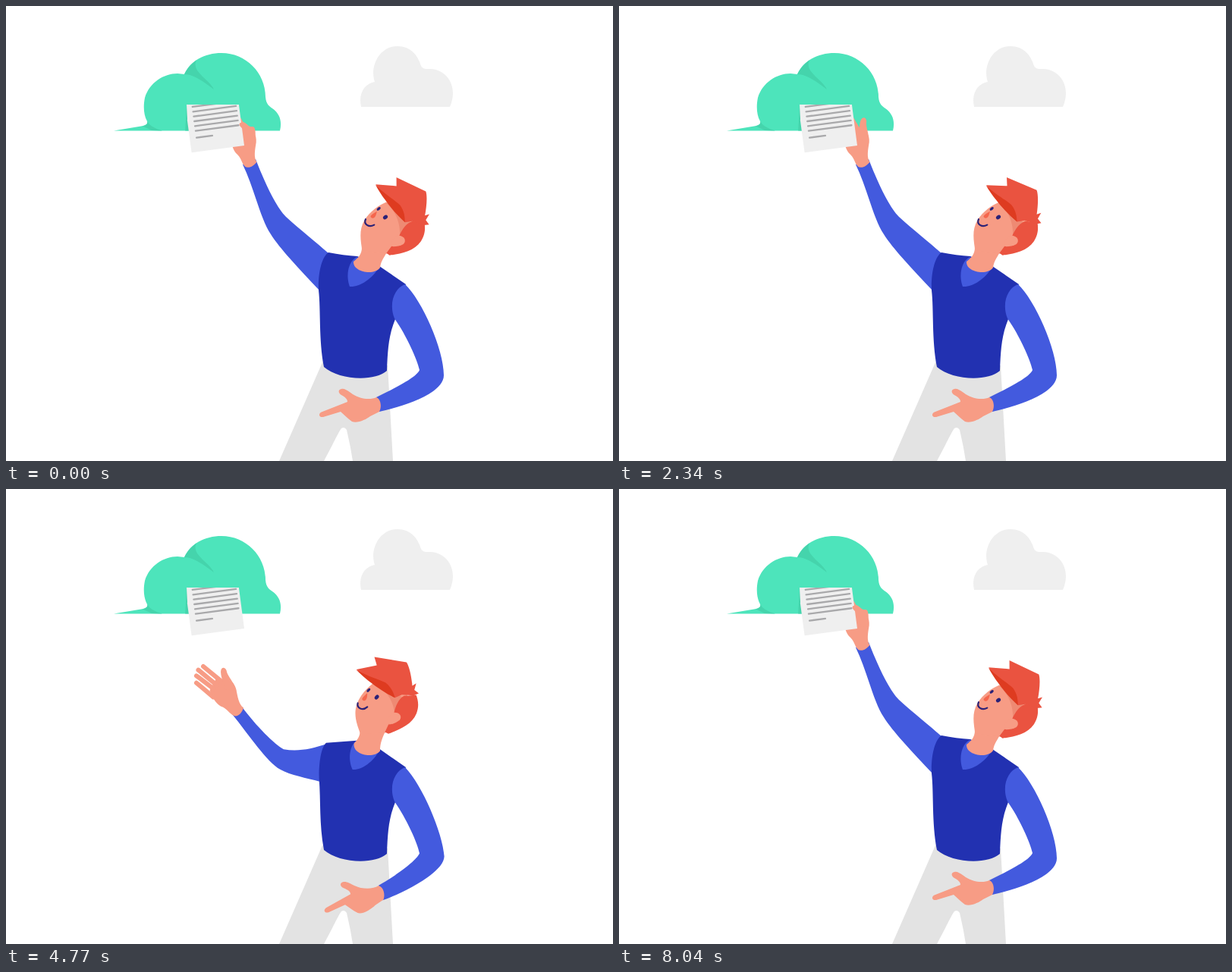
Write an HTML page that moves like this. It is 800 px wide and 600 px high and loops after 8.1 s.

```html
<!DOCTYPE html>
<html lang="en">
<head>
<meta charset="utf-8">
<title>Paper from the cloud</title>
<style>
html, body { margin: 0; width: 100%; height: 100%; overflow: hidden; background: #fff; }
svg { display: block; width: 800px; height: 600px; }
.skin { fill: #f79c85; }
.hair { fill: #ea5340; }
.sleeve { fill: #435ade; }
.vest { fill: #2231b1; }
.ink { fill: #2b2277; }
.grey { fill: #efefef; }
.fold { fill: #45d4ac; }
.fingers { fill: none; stroke: #f79c85; stroke-width: 6; stroke-linecap: round; }
.lines { fill: none; stroke: #a9a9ab; stroke-width: 2.3; stroke-linecap: round; }
</style>
</head>
<body>
<svg viewBox="0 0 800 600">
  <defs>
    <path id="cloud" d="M142,164.500L178,158.500Q188,157 186,152C181,143 181,131 183,121C189,101 208,89 226,89L235,90C243,72 262,62 284,62C316,62 342,88 342,120C343,130 347,132 351,135C361,142 364,152 361,164.500Z"/>
    <clipPath id="inCloud"><use href="#cloud"/></clipPath>
    <clipPath id="belowSlot"><path d="M238,130H800V600H0V150H239Z"/></clipPath>
  </defs>

  <path class="grey" d="M468,133C464,115 473,102 486,100C479,80 492,53 516,53C533,53 543,65 547,79C550,84 555,83 560,83C580,84 597,105 585,133Z"/>
  <use href="#cloud" fill="#4de4bb"/>
  <path class="fold" d="M251,71.500C243,77 238,84 235,90C246,90 258,98 274,110C270,100 252,90 250,80C249,76 250,74 251,71.500Z"/>
  <path class="fold" d="M180,158.300Q188,157 186,152Q190,160 206,164.500L192,164Z"/>
  <path id="shade" class="fold" clip-path="url(#inCloud)"/>

  <path fill="#e3e3e3" d="M417,470L360,600H419C430,580 438,562 442,557Q446,554 449,559Q454,580 457,600H510L503,474Z"/>

  <path id="armL" class="sleeve"/>
  <g id="handL">
    <path class="skin" d="M298,406C290,404 285,396 279,388C273,381 266,379 258,384L249,386L248,404C255,411 262,416 270,417C280,416 284,421 291,421C297,420 299,413 298,406Z"/>
    <path class="fingers" d="M227,379L258,387M223,386L254,394M224,394L252,400M228,402.500L256,410"/>
  </g>
  <g clip-path="url(#belowSlot)">
    <g id="paper">
      <path id="sheet" class="grey"/>
      <path id="text" class="lines"/>
    </g>
  </g>
  <path id="thumb" class="skin"/>

  <path id="vest" class="vest"/>
  <path id="collar" class="sleeve"/>
  <path id="neck" class="skin"/>
  <g id="head">
    <path class="skin" d="M436,252C427,265 424,280 425,292C427,308 438,317 447,326L476,309L476,300L480,252Z"/>
    <path fill="#ee8a73" d="M434,257C450,258 465,266 475,281V258L445,252Z"/>
    <path class="hair" d="M476,255C471,262 472,272 474,281L474.500,309H479.500C490,298 502,285 501,269C500,258 495,252 490,247Z"/>
    <path class="skin" d="M472,282C479,276 486,280 485,286C483,291 478,296 474.500,298L470,292Z"/>
    <g id="hair">
      <path class="hair" d="M408,246L431,231L424,222L466,213C472,217 480,230 484.500,239L488,234L489,243L496,245L491,250L476,255L469,262Q438,258 408,246Z"/>
      <path fill="#de3b20" d="M408,246.500C425,249 440,247 450,248C460,251 465,257 469,262C450,261 425,254 408,246.500Z"/>
    </g>
    <path fill="#f5664d" d="M431,273C429,278 427,283 429,284C433,285 434,282 433,278Z"/>
    <ellipse class="ink" cx="444.500" cy="272.500" rx="2.400" ry="3.400" transform="rotate(14 444.500 272.500)"/>
    <ellipse class="ink" cx="430.700" cy="269" rx="1.700" ry="3" transform="rotate(14 430.700 269)"/>
    <path d="M425.500,290.500C427,297.500 436,297 439,289.500" fill="none" stroke="#2b2277" stroke-width="2.200" stroke-linecap="round"/>
  </g>

  <path id="armR" class="sleeve"/>
  <g id="handR">
    <path class="skin" d="M488,516C480,520 466,518 457,512C450,507 446,504 442,505C437,506 438,511 442,513C447,516 450,518 450,522L417,535C411,537 412,543 418,542L441,535C446,539 450,544 456,548C463,551 475,545 480,541L492,535C495,530 495,519 488,516Z"/>
  </g>
</svg>
<script>
const el = Object.fromEntries([...document.querySelectorAll('svg [id]')].map(e => [e.id, e]));
const CYCLE = 2700, GRAB = 2420, DROP = 840, PRINT = 1080;

// Each shape has three poses: arm up, halfway, arm low.
const shapes = {
  armL: [
    'M425,326C408,311 390,297 369,278C356,265 342,235 329,202L312,209C327,240 335,280 349,301C361,320 385,345 414,376Z',
    'M420,343C400,362 382,378 364,384C352,381 322,361 300,341L289,352C318,380 350,411 369,413C385,414 400,403 417,393Z',
    'M404,352C395,380 379,418 370,423C352,424 322,413 296,405L286,421C310,434 358,452 381,452C396,452 402,432 412,424Z'],
  armR: [
    'M526,367C512,372 504,392 512,412C528,435 542,466 545,480C541,490 512,504 488,516L492,535C520,529 577,512 577,487C577,452 548,388 526,367Z',
    'M526,367C512,372 504,392 512,412C528,435 543,468 545,481C540,491 515,514 493,527L499,547C528,534 577,502 578,483C575,455 548,390 526,367Z',
    'M516,361C502,366 495,390 505,406C520,425 541,458 545,470C538,485 518,512 501,528L511,549C535,528 578,489 578,470C577,447 545,386 516,361Z'],
  vest: [
    'M425,325Q445,329 463,330L492,343L527,367L513,413C504,435 503,455 502,481C485,496 438,493 419,476C412,440 415,400 412,375C411,350 417,330 425,325Z',
    'M420,341Q440,336 462,333L493,343L527,367L513,413C504,435 503,455 502,481C485,496 438,493 419,476C413,440 415,420 413,385C413,362 416,345 420,341Z',
    'M405,351Q420,343 444,337L479,340L516,361L506,407C500,430 501,450 503,474C487,495 438,495 419,480C412,445 405,410 404,385C404,365 403,355 405,351Z'],
  collar: [
    'M462,331C450,338 448,357 453,370C465,371 482,361 492,344Z',
    'M460,334C453,342 453,360 459,370C470,371 485,360 493,344Z',
    'M444,338C442,350 444,360 452,371C460,371 472,360 478,343Z'],
  neck: [
    'M469,318C469,328 464,332 458,337C457,351 485,356 493,345C494,335 500,330 503,322Z',
    'M465,318C466,326 461,331 459,335C457,351 484,356 493,346C492,335 494,326 499,316Z',
    'M446,322C450,328 446,333 444,337C443,356 474,357 479,345C477,336 475,326 477,308Z']
};
const thumbOpen = 'M280,390C271,379 262,378 257,371C253,367 248,370 251,376C254,382 259,386 266,394Z';
const thumbBent = 'M280,390C273,384 265,373 261,377C257,383 247,376 246,386C249,392 266,381 271,398Z';

// x, y, angle for the same three poses
const wristL = [[320.5, 206.5, 45], [293.5, 346.5, 12.5], [291.5, 413.5, 0]];
const wristR = [[490, 526, 0], [497, 537, -12.5], [507, 538.5, -24.6]];
const eye = [[500, 278.5, 37.6], [481.5, 272, 19], [444.5, 272.5, 0]];
const held = [[314, 184, -7.5], [281, 336, -18.5], [278, 403, -16]];

const poseKeys = [[0, 0], [210, 0], [360, .42], [510, 1], [840, 1.85], [1080, 2.045], [1200, 2.04],
  [1380, 2], [1680, 1.78], [1860, 1.55], [2090, .55], [2330, 0], [2700, 0]];
const hairKeys = [[0, 0], [1700, 0], [2150, -5], [2340, -2.3], [2600, 0], [2700, 0]];

const clamp = v => Math.max(0, Math.min(1, v));
const ramp = (t, a, b) => { const u = clamp((t - a) / (b - a)); return u * u * (3 - 2 * u); };
const mix = (a, b, k) => a + (b - a) * k;

// Cubic curve through the keys; flat wherever the direction turns.
function curve(keys, t) {
  const slope = i => (keys[i + 1][1] - keys[i][1]) / (keys[i + 1][0] - keys[i][0]);
  const tangent = i => {
    if (i < 1 || i > keys.length - 2) return 0;
    const a = slope(i - 1), b = slope(i);
    return a * b > 0 ? 2 * a * b / (a + b) : 0;
  };
  let i = 0;
  while (i < keys.length - 2 && t > keys[i + 1][0]) i++;
  const w = keys[i + 1][0] - keys[i][0], u = (t - keys[i][0]) / w, v = 1 - u;
  return keys[i][1] * (1 + 2 * u) * v * v + keys[i + 1][1] * u * u * (3 - 2 * u)
    + w * u * v * (tangent(i) * v - tangent(i + 1) * u);
}

function morph(a, b, k) {
  const to = b.match(/-?[\d.]+/g);
  let i = 0;
  return a.replace(/-?[\d.]+/g, n => mix(+n, +to[i++], k).toFixed(2));
}

function posed(list, s) {
  const i = s < 1 ? 0 : 1;
  return list[i].map((v, n) => mix(v, list[i + 1][n], s - i));
}

const place = (node, [x, y, a], px, py) =>
  node.setAttribute('transform', `translate(${x} ${y}) rotate(${a}) translate(${-px} ${-py})`);

// Text lines are measured from the sheet's lower right corner.
let rows = 'M-61,-18.500h21M-61,-72.500h11';
for (let i = 0; i < 7; i++) rows += `M-61,${-27.5 - 6.4 * i}h57`;
el.text.setAttribute('d', rows);

function drawPaper(t, s) {
  let pos, alpha = 1, bow = 0;
  if (t >= PRINT) {
    const rest = (1 - clamp((t - PRINT) / 570)) ** 2;
    pos = [314 - 9 * rest, 184 - 86 * rest, -7.5 - 7.5 * rest];
  } else {
    pos = posed(held, s);
    const away = ramp(t, DROP - 20, PRINT);
    pos[0] -= 28 * away;
    pos[2] -= 3 * away;
    alpha = 1 - ramp(t, DROP + 30, PRINT - 10);
    bow = 4 * Math.min(1, s);
  }
  place(el.paper, pos, 0, 0);
  el.paper.setAttribute('opacity', alpha);
  el.sheet.setAttribute('d', `M-70.500,-95H0Q${bow},-48 0,0H-70Q${bow - 70},-48 -70.500,-95Z`);

  const a = pos[2] * Math.PI / 180, [x, y] = pos;
  const left = y - 70 * Math.sin(a), top = left - 95 * Math.cos(a);
  const inSlot = top < 130 && left > 130;
  el.shade.setAttribute('d', inSlot
    ? `M238,130H305L${x - 4},${y + 17}L${Math.max(234, 236 - (left - 144) / 25)},${left + 13}Z` : '');
}

function draw(now) {
  const t = now % CYCLE, s = curve(poseKeys, t), i = s < 1 ? 0 : 1;
  const drift = Math.max(0, s - 2) * 90;

  for (const id in shapes) el[id].setAttribute('d', morph(shapes[id][i], shapes[id][i + 1], s - i));
  if (drift) {
    const d = el.armL.getAttribute('d').replace(/([\d.]+),/g,
      (m, x) => (x - drift * clamp((400 - x) / 100)).toFixed(2) + ',');
    el.armL.setAttribute('d', d);
  }

  const hand = posed(wristL, s);
  hand[0] -= drift;
  place(el.handL, hand, 291.5, 413.5);
  place(el.thumb, hand, 291.5, 413.5);
  const grip = t < 1500 ? 1 - ramp(t, DROP - 40, DROP + 80) : ramp(t, GRAB - 50, GRAB + 70);
  el.thumb.setAttribute('d', morph(thumbOpen, thumbBent, grip));

  place(el.handR, posed(wristR, s), 490, 526);
  place(el.head, posed(eye, s), 444.5, 272.5);
  el.hair.setAttribute('transform', `rotate(${curve(hairKeys, t)} 475 295)`);
  drawPaper(t, s);
}

const start = performance.now();
function frame() {
  draw(performance.now() - start);
  requestAnimationFrame(frame);
}
frame();
</script>
</body>
</html>
```
